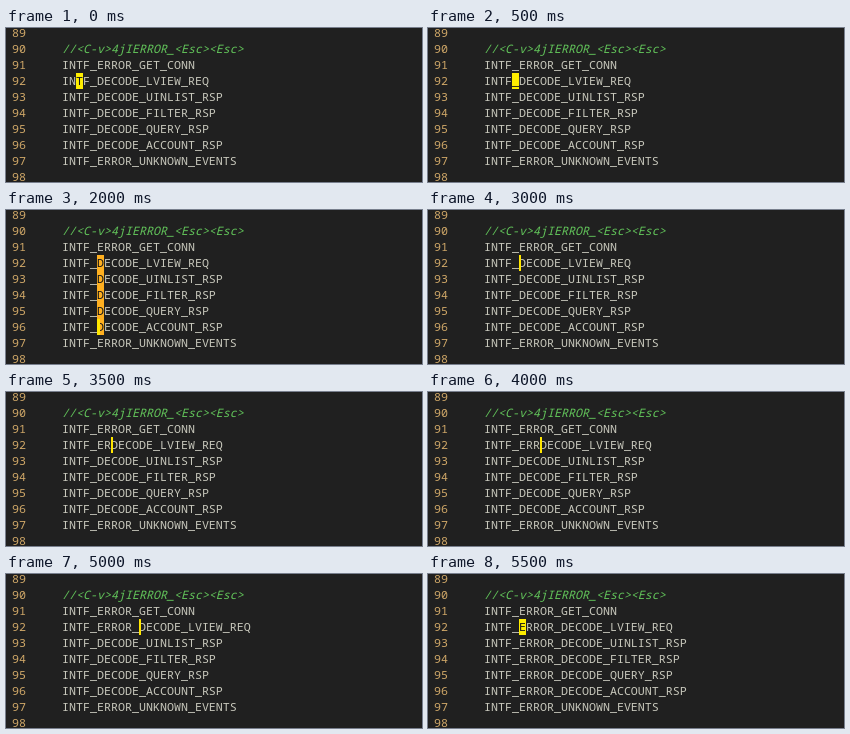
Animation of 416 by 154 pixels, one loop 6000 ms. Source, as an HTML page:

```html
<!DOCTYPE html>
<html lang="en">
<head>
<meta charset="utf-8">
<title>Block insert</title>
<style>
  html, body { margin: 0; width: 100%; height: 100%; overflow: hidden; background: #202020; }
  #stage {
    position: relative; width: 416px; height: 154px; overflow: hidden;
    background: #202020; color: #c8c8bc;
    font: 300 11.667px/16px "Noto Sans Mono", "Liberation Mono", monospace;
    font-variant-ligatures: none; white-space: pre;
  }
  .num, .code { position: absolute; height: 16px; }
  .num { left: 6px; color: #d0a868; }
  .code { left: 56px; }
  .note { color: #62c45a; font-style: italic; }
  .mark, #bar { position: absolute; height: 16px; }
  .mark { width: 7px; color: #181818; }
  #bar { background: #ffe600; }
</style>
</head>
<body>
<div id="stage"></div>
<script>
const CELL = 7, ROW = 16, LEFT = 56, FIRST = 89, LOOP = 6000;
const YELLOW = "#ffee00", ORANGE = "#ffb020";
const TARGET = 92, LAST = 96, COL = 5;
const lines = {
  90: "//<C-v>4jIERROR_<Esc><Esc>",
  91: "INTF_ERROR_GET_CONN",
  92: "INTF_DECODE_LVIEW_REQ",
  93: "INTF_DECODE_UINLIST_RSP",
  94: "INTF_DECODE_FILTER_RSP",
  95: "INTF_DECODE_QUERY_RSP",
  96: "INTF_DECODE_ACCOUNT_RSP",
  97: "INTF_ERROR_UNKNOWN_EVENTS"
};

// Each step: start time, mode, and its column, last row or typed text.
const steps = [
  [0, "normal", 2],
  [500, "normal", 4],
  [1000, "normal", COL],
  [1500, "visual", TARGET],
  [2000, "visual", LAST],
  [3000, "insert", ""],
  [3500, "insert", "ER"],
  [4000, "insert", "ERR"],
  [4500, "insert", "ERROR"],
  [5000, "insert", "ERROR_"],
  [5500, "done", "ERROR_"]
];

const stage = document.getElementById("stage");
const rowTop = n => (n - FIRST) * ROW - 3;
const cellLeft = col => LEFT + col * CELL;

function add(className, top, text = "") {
  const el = document.createElement("div");
  el.className = className;
  el.style.top = top + "px";
  el.textContent = text;
  return stage.appendChild(el);
}

const code = {}, marks = {};
for (let n = FIRST; n <= 98; n++) {
  add("num", rowTop(n), n);
  if (lines[n]) code[n] = add(n === 90 ? "code note" : "code", rowTop(n), lines[n]);
}
for (let n = TARGET; n <= LAST; n++) marks[n] = add("mark", rowTop(n));
const bar = add("", 0);
bar.id = "bar";

function place(n, col, color) {
  const mark = marks[n];
  mark.hidden = false;
  mark.textContent = code[n].textContent[col];
  mark.style.left = cellLeft(col) + "px";
  mark.style.background = color;
}

function placeBar(n, col, width) {
  bar.hidden = false;
  bar.style.top = rowTop(n) + "px";
  bar.style.left = cellLeft(col) + "px";
  bar.style.width = width + "px";
}

function show([, mode, value]) {
  const typed = mode === "insert" || mode === "done" ? value : "";
  bar.hidden = true;
  for (let n = TARGET; n <= LAST; n++) {
    const text = lines[n];
    const added = n === TARGET || mode === "done" ? typed : "";
    code[n].textContent = text.slice(0, COL) + added + text.slice(COL);
    marks[n].hidden = true;
  }
  if (mode === "normal") place(TARGET, value, YELLOW);
  if (mode === "done") place(TARGET, COL, YELLOW);
  if (mode === "insert") placeBar(TARGET, COL + typed.length, 2);
  if (mode === "visual") {
    for (let n = TARGET; n <= value; n++) place(n, COL, ORANGE);
    placeBar(value, COL, 3);
  }
}

let current;
const start = performance.now();
function tick() {
  const t = (performance.now() - start) % LOOP;
  const step = steps.findLast(s => s[0] <= t);
  if (step !== current) show(current = step);
  requestAnimationFrame(tick);
}
tick();
</script>
</body>
</html>
```
